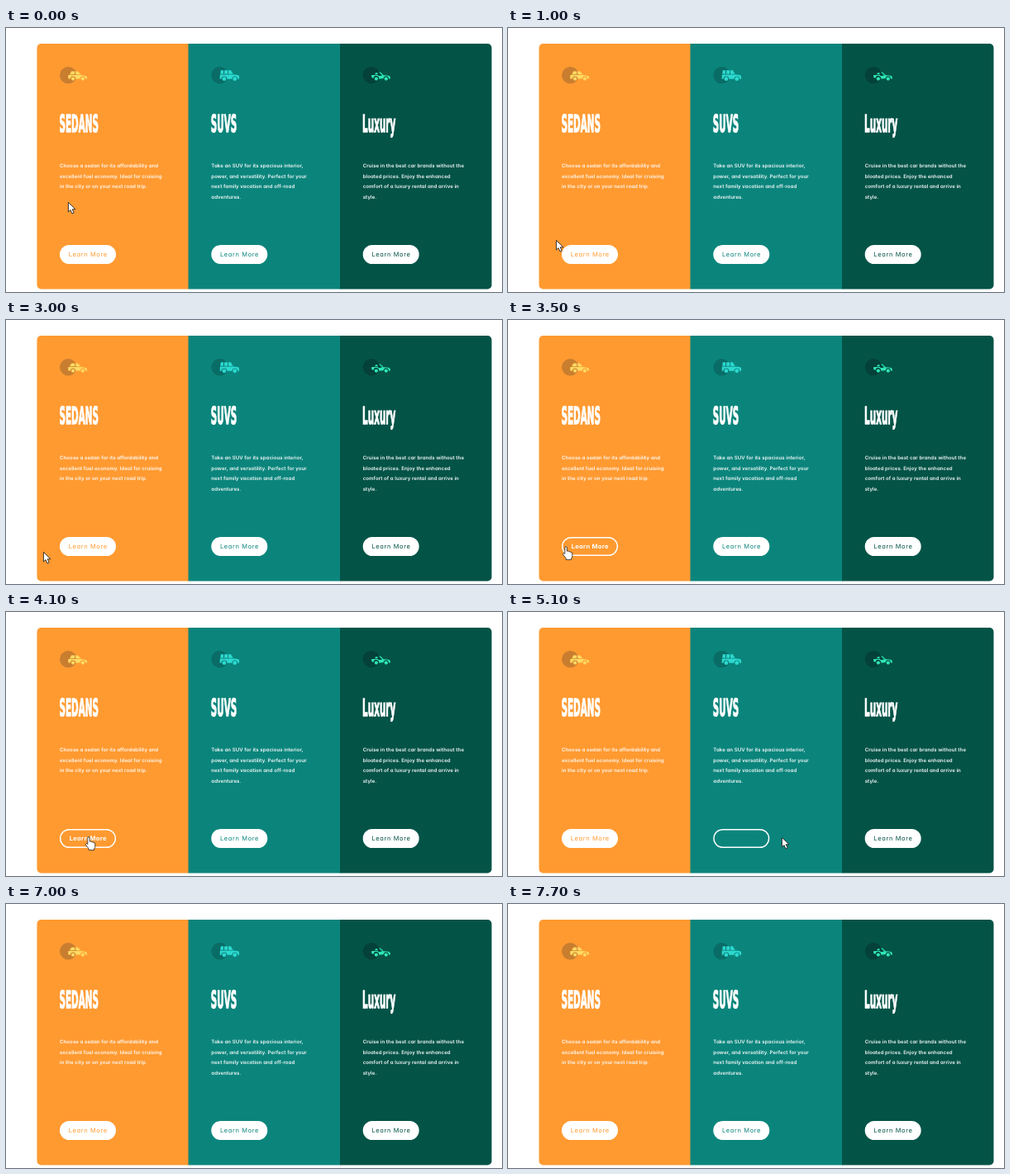
An HTML page for the animation above (7.8 s loop, 600 by 320 pixels).

```html
<!DOCTYPE html>
<html lang="en">
<head>
<meta charset="utf-8">
<title>Car rental columns</title>
<style>
  html, body { margin: 0; width: 100%; height: 100%; overflow: hidden; background: #fff; }
  svg { display: block; width: 600px; height: 320px; }
  text { text-rendering: geometricPrecision; }
  .title { font: 700 29px "DejaVu Sans", Verdana, sans-serif; fill: #fff; stroke: #fff; stroke-width: 1.3px; }
  .copy { font: 600 6.1px Inter, sans-serif; letter-spacing: .06px; fill: #fff; fill-opacity: .95; }
  .label { font: 400 7.5px Inter, sans-serif; letter-spacing: .6px; }
  .label.over { font-weight: 700; letter-spacing: .3px; }
  .copy, .label { font-feature-settings: "cv11"; }
</style>
</head>
<body>
<svg id="stage" viewBox="0 0 600 320">
  <defs>
    <clipPath id="card"><rect x="37.5" y="19" width="550" height="297.5" rx="5"/></clipPath>
    <g id="sedan">
      <path d="M12 5.6 L14.2 1.8 H18.2 V5.6 Z M19.2 1.8 H22 L25.4 5.6 H19.2 Z"/>
      <path d="M10.3 6.4 H26 L31.5 7.2 Q33.2 7.6 33.2 9.6 V10.8 H31 A3.1 3.1 0 0 0 24.8 10.8 H19.2 A3.1 3.1 0 0 0 13 10.8 H10.3 Z"/>
      <circle cx="16.1" cy="10.9" r="2.1"/><circle cx="27.9" cy="10.9" r="2.1"/>
    </g>
    <g id="suv">
      <path d="M11.5 .6 H14.8 V5 H11 Z M15.8 .6 H19.8 V5 H15.8 Z M20.8 .6 H23.6 L26.4 5 H20.8 Z"/>
      <path d="M10.5 5.9 H27 L32 6.3 Q33.8 6.6 33.8 8.4 V11 H31.8 A3.3 3.3 0 0 0 25.2 11 H19 A3.3 3.3 0 0 0 12.4 11 H10.5 Z"/>
      <circle cx="15.7" cy="11" r="2.4"/><circle cx="28.5" cy="11" r="2.4"/>
    </g>
    <g id="open">
      <path d="M14.5 5.6 L15.4 3.6 H17.6 L18 5.6 Z M19.5 3 L20.7 2.6 L25 6 H23 Z"/>
      <path d="M10.5 6.2 H18 L19.2 7.4 H22 L23 6.4 L31 7 Q33.2 7.4 33.2 9.6 V10.8 H31.2 A3.1 3.1 0 0 0 25 10.4 L22 10.8 H19.4 A3.2 3.2 0 0 0 13 10 L10.5 9.4 Z"/>
      <circle cx="16.2" cy="10.9" r="2.1"/><circle cx="28.1" cy="10.9" r="2.1"/>
    </g>
  </defs>
  <g id="columns" clip-path="url(#card)"></g>
  <g id="pointer" stroke-linejoin="round">
    <path id="arrow" fill="#fff" stroke="#222" stroke-width=".9" d="M.4 .3 V12 L3 9.6 L5 14 L7.2 13 L5.2 8.8 H9 Z"/>
    <path id="hand" fill="#fff" stroke="#222" stroke-width=".8" d="M-1.2 8.5 V1 Q-1.2 -.4 0 -.4 Q1.3 -.4 1.3 1 V5.2 Q3 4.5 3.7 5.8 Q5.4 5.3 6 6.6 Q7.8 6.3 7.8 8.2 V11 Q7.8 13 6.5 14 V15.6 H.2 V14 L-3.4 9.3 Q-4 8 -3 7.6 Q-2 7.3 -1.2 8.5 Z"/>
  </g>
</svg>
<script>
const LOOP = 7800, STEP = 100;
const $ = id => document.getElementById(id);

const cards = [
  { x: 65, title: "SEDANS", icon: "sedan", bg: "#ff9a31", disc: "#c97e2f", car: "#ffda62",
    copy: ["Choose a sedan for its affordability and", "excellent fuel economy. Ideal for cruising", "in the city or on your next road trip."] },
  { x: 248.3, title: "SUVS", icon: "suv", bg: "#0b857c", disc: "#0a6c66", car: "#2bd9cf",
    copy: ["Take an SUV for its spacious interior,", "power, and versatility. Perfect for your", "next family vacation and off-road", "adventures."] },
  { x: 431.7, title: "Luxury", icon: "open", bg: "#045347", disc: "#03413a", car: "#2ee6b6",
    copy: ["Cruise in the best car brands without the", "bloated prices. Enjoy the enhanced", "comfort of a luxury rental and arrive in", "style."] }
];

$("columns").innerHTML = cards.map((c, n) => `
  <rect x="${37 + n * 183.5}" y="19" width="184" height="298" fill="${c.bg}"/>
  <circle cx="${c.x + 10.3}" cy="57.2" r="10.3" fill="${c.disc}"/>
  <use href="#${c.icon}" x="${c.x}" y="50.7" fill="${c.car}"/>
  <text class="title" transform="translate(${c.x - .6} 125.5) scale(.36 1)">${c.title}</text>
  ${c.copy.map((line, i) => `<text class="copy" x="${c.x}" y="${169 + i * 12.5}">${line}</text>`).join("")}
  <rect class="pill" x="${c.x + .7}" y="263.7" width="66.6" height="21.6" rx="10.8" stroke="#fff" stroke-width="1.4"/>
  <text class="label" x="${c.x + 34.2}" y="277.2" text-anchor="middle">Learn More</text>`).join("");

const pills = document.querySelectorAll(".pill");
const labels = document.querySelectorAll(".label");

// time, x, y of the pointer tip
const path = [
  [0, 75, 211], [1000, 58, 257], [1600, 5, 272], [2400, 5, 272], [3000, 45, 281],
  [3500, 70, 275], [4100, 100, 273], [4300, 138, 273], [4700, 252, 273], [5000, 312, 273],
  [5100, 331, 273], [5500, 434, 274], [5800, 484, 275], [6600, 484, 275], [6900, 500, 301]
];
// card, hover start, hover end, end of the fade back
const hovers = [[0, 3500, 4300, 4400], [1, 4700, 5100, 5200], [2, 5500, 6700, 6800]];

function tipAt(t) {
  const i = path.findIndex(p => p[0] > t);
  if (i < 0) return null;
  const [a, b] = [path[i - 1], path[i]];
  const k = (t - a[0]) / (b[0] - a[0]);
  return [a[1] + (b[1] - a[1]) * k, a[2] + (b[2] - a[2]) * k];
}

function render(time) {
  const t = Math.floor(time % LOOP / STEP) * STEP;
  let pointing = false;
  for (const [n, from, to, done] of hovers) {
    const over = t >= from && t < to;
    const bare = t >= from && t < done;
    pointing ||= over;
    pills[n].setAttribute("fill", bare ? cards[n].bg : "#fff");
    labels[n].setAttribute("fill", over ? "#fff" : cards[n].bg);
    labels[n].classList.toggle("over", over);
  }
  const tip = tipAt(t);
  $("pointer").style.display = tip ? "" : "none";
  if (tip) $("pointer").setAttribute("transform", `translate(${tip})`);
  $("hand").style.display = pointing ? "" : "none";
  $("arrow").style.display = pointing ? "none" : "";
}

const start = performance.now();
function tick() {
  render(performance.now() - start);
  requestAnimationFrame(tick);
}
tick();
</script>
</body>
</html>
```
